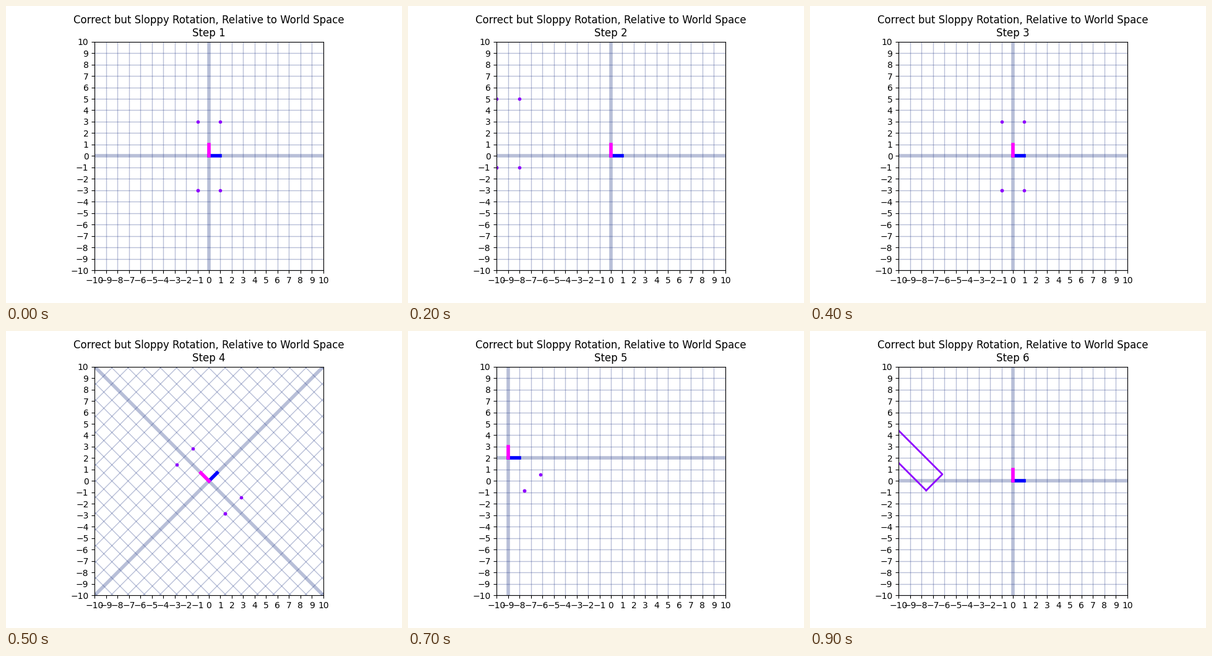
These frames come from a looping animation (640 by 480 pixels, 1 s). A matplotlib script:

```python
import numpy as np
import matplotlib.pyplot as plt
from matplotlib.animation import FuncAnimation

GRID_COLOR = "#152c7f"
SHAPE_COLOR = "#8f00ff"
EXTENT = 30
TITLE = "Correct but Sloppy Rotation, Relative to World Space\nStep {}"


def translation(x, y):
    return np.array([[1, 0, x], [0, 1, y], [0, 0, 1]], float)


def rotation(degrees):
    c, s = np.cos(np.radians(degrees)), np.sin(np.radians(degrees))
    return np.array([[c, -s, 0], [s, c, 0], [0, 0, 1]])


def apply(matrix, points):
    points = np.asarray(points, float)
    return (points @ matrix[:2, :2].T + matrix[:2, 2]).T


WORLD = np.eye(3)
MOVES = [translation(-9, 2), translation(9, -2), rotation(45), translation(-9, 2)]
RECTANGLE = [(-1, -3), (1, -3), (1, 3), (-1, 3), (-1, -3)]

# Each move shows its transformed grid first, then the world grid again.
scenes = [(1, WORLD, WORLD, False)]
placement = WORLD
for step, move in enumerate(MOVES, start=2):
    placement = move @ placement
    scenes += [(step, move, placement, False), (step, WORLD, placement, False)]
scenes.append((6, WORLD, placement, True))

fig, ax = plt.subplots(figsize=(6.4, 4.8), dpi=100)
ax.set(xlim=(-10, 10), ylim=(-10, 10), aspect="equal",
       xticks=range(-10, 11), yticks=range(-10, 11))
title = ax.set_title("")

segments = []


def add_segment(start, end, **style):
    line, = ax.plot([], [], **style)
    segments.append((line, [start, end]))


for k in range(-EXTENT, EXTENT + 1):
    style = dict(color=GRID_COLOR, alpha=0.3, lw=1 if k else 4)
    add_segment((k, -EXTENT), (k, EXTENT), **style)
    add_segment((-EXTENT, k), (EXTENT, k), **style)
add_segment((0, 0), (1, 0), color="blue", lw=4)
add_segment((0, 0), (0, 1), color="magenta", lw=4)
shape, = ax.plot([], [], color=SHAPE_COLOR, lw=2)


def draw(frame):
    step, grid, placed, outlined = scenes[frame]
    title.set_text(TITLE.format(step))
    for line, ends in segments:
        line.set_data(*apply(grid, ends))
    shape.set_data(*apply(placed, RECTANGLE))
    shape.set_linestyle("-" if outlined else "none")
    shape.set_marker("none" if outlined else ".")
    return [title, shape] + [line for line, _ in segments]


anim = FuncAnimation(fig, draw, frames=len(scenes), interval=100,
                     init_func=lambda: draw(0), repeat=True, repeat_delay=0)
plt.show()
```
